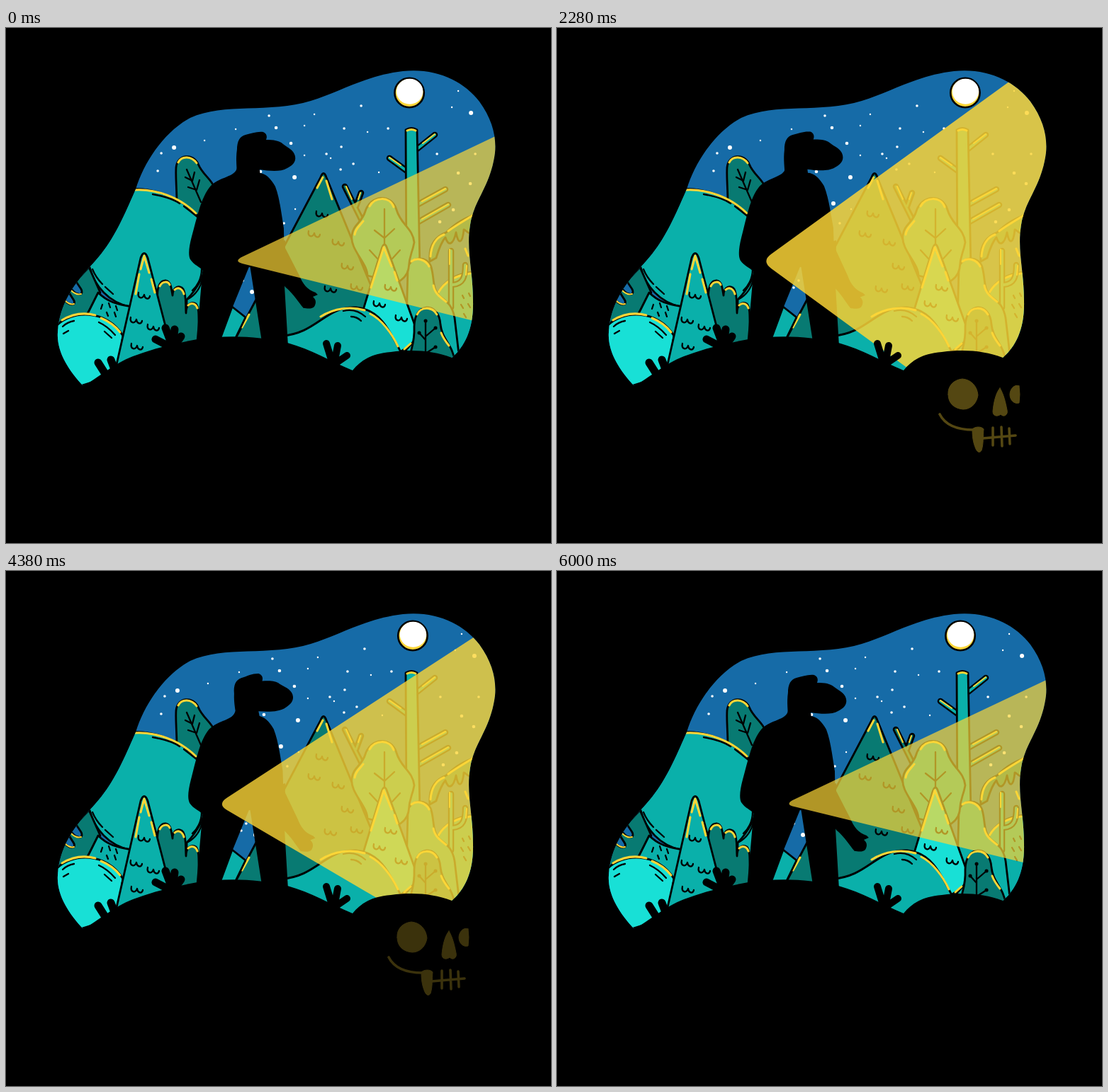
An HTML page for the animation above (6.06 s loop, 769 px wide and 728 px high).

```html
<!DOCTYPE html>
<html lang="en">
<head>
<meta charset="utf-8">
<title>Night walk</title>
<style>
  html, body { margin: 0; width: 100%; height: 100%; overflow: hidden; background: #000; }
  svg { display: block; width: 100%; height: 100%; }
  .scene path { stroke: #000; stroke-width: 2.8; stroke-linejoin: round; stroke-linecap: round; fill: none; }
  .scene .teal { fill: #0ab0aa; }
  .scene .dark { fill: #087a72; }
  .scene .bright { fill: #18e0d6; }
  .scene .sky { fill: #166ba7; }
  .scene .glow { stroke: #fdd637; stroke-width: 3; }
  .scene .ink { stroke-width: 2.3; }
  .scene .bark { stroke-width: 8.5; }
  .scene .wood { stroke: #0ab0aa; stroke-width: 4; }
  .scene .darkwood { stroke: #087a72; stroke-width: 3; }
  .scene .thin { stroke-width: 2; }
  #scales { fill: none; stroke: #000; stroke-width: 2.3; stroke-linecap: round; stroke-linejoin: round; }
  .skull path { fill: none; stroke: #fdd637; stroke-width: 3.6; stroke-linecap: round; stroke-linejoin: round; }
  .skull .solid { fill: #fdd637; stroke-width: 1; }
  .leaf { stroke: #000; stroke-width: 11; stroke-linecap: round; fill: none; }
</style>
</head>
<body>
<svg viewBox="0 0 769 728">
  <defs>
    <clipPath id="window">
      <path d="M109,506 C88,484 71,457 73,430 C75,393 94,364 118,338 C149,306 162,276 183,228 C195,189 223,147 260,127 C308,105 372,121 430,103 C472,90 508,67 560,61 C607,56 646,75 668,104 C686,129 692,153 690,176 C684,224 660,243 655,278 C649,314 659,342 659,386 C660,424 648,450 629,466 L600,520Z"/>
    </clipPath>
    <path id="scales" d="M-7,-4 C-9,4 -1,6 1,-1 C2,6 8,6 9,1"/>
  </defs>

  <g clip-path="url(#window)">
    <rect width="769" height="728" fill="#166ba7"/>
    <g id="heavens">
      <g id="stars" fill="#fff"></g>
      <circle cx="569" cy="91.5" r="20.7" fill="#fdd637" stroke="#000" stroke-width="2.6"/>
      <ellipse cx="569.5" cy="89.7" rx="18.7" ry="18" fill="#fff"/>
    </g>

    <g class="scene">
      <!-- leaf tree and big hill -->
      <path class="dark" d="M241,250 C241,225 239,210 240,197 C242,178 264,177 271,192 C277,207 290,214 293,224 C292,240 282,255 273,270Z"/>
      <path class="glow" d="M243,190 C248,180 262,181 269,191"/>
      <path class="ink" d="M255,200 L275,246 M253,211 L263,216 L266,204 M257,225 L269,229 L273,215"/>
      <path class="teal" d="M255,384 L285,340 L285,460 L255,460Z"/>
      <path class="teal" d="M60,300 L170,228 C205,224 245,238 271,266 C292,300 289,350 254,385 C225,401 195,399 175,394 C145,388 125,365 118,338Z"/>
      <path class="glow" d="M181,229 C212,227 246,240 268,262"/>
      <path class="ink" d="M207,235 C224,238 238,243 245,248 M251,252 L270,267 M122,341 C126,351 131,357 136,362 M140,366 L151,376 M276,341 C276,355 269,366 263,371 M277,355 C274,368 266,378 257,383"/>

      <!-- lower left -->
      <path class="dark" d="M60,400 L117,338 L133,374 L113,407 L70,425Z"/>
      <path class="sky" d="M88,360 C92,372 100,378 106,376 C110,370 102,366 98,356Z M76,376 C83,388 91,393 96,390 C99,385 91,381 88,371Z"/>
      <path class="glow thin" d="M92,371 Q99,378 106,376 M83,385 Q90,392 96,390"/>
      <path class="teal" d="M130,374 L113,408 L168,450 L178,394 C157,391 143,387 130,374Z"/>
      <path class="ink" d="M136,391 l-2,6 M145,389 l2,6 M155,393 l2,6 M142,402 l2,5 M153,402 l2,6"/>
      <path class="bright" d="M60,520 L70,422 C92,398 142,397 165,435 L156,490Z"/>
      <path class="glow" d="M79,413 C94,404 111,402 126,406 M134,410 C144,414 154,421 161,430"/>
      <path class="ink" d="M80,422 C85,417 90,415 96,414 M81,432 L88,428 M131,416 C142,421 148,427 154,434 M139,429 L149,438"/>

      <!-- left spruce and finger bush -->
      <path class="dark" d="M222,460 L214,385 C212,363 219,357 225,357 C232,358 233,365 235,378 C235,365 246,363 250,369 C255,378 253,390 254,403 C254,390 262,386 268,390 C273,395 272,405 272,460Z"/>
      <path class="glow" d="M217,365 C221,357 229,358 231,363 M238,370 C243,365 249,369 251,376 M257,392 C262,387 268,390 270,396"/>
      <path class="teal" d="M155,480 L190,325 Q195,312 200,325 L235,460 Z"/>
      <path class="glow" d="M183,376 L188,348 M190,341 L195,322 L202,346 M205,355 L210,374"/>
      <g>
        <use href="#scales" x="194" y="378"/><use href="#scales" x="183" y="413"/><use href="#scales" x="207" y="423"/><use href="#scales" x="184" y="450"/>
      </g>

      <!-- bare trees -->
      <path class="bark" d="M580,171 L605,151 M567,203 L541,184 M582,249 L620,228 M582,274 L624,250"/>
      <path class="wood" d="M580,171 L605,151 M567,203 L541,184 M582,249 L620,228 M582,274 L624,250"/>
      <path class="teal" d="M565,340 L564,144 Q572,139 580,144 L584,340"/>
      <path class="glow" d="M566,145 Q572,142 578,145"/>
      <path class="glow thin" d="M588,163 L605,150 M557,194 L541,183 M587,245 L620,227 M587,270 L624,249"/>
      <path class="bark" d="M505,278 L478,224 M494,252 L501,233"/>
      <path class="darkwood" d="M505,278 L478,224 M494,252 L501,233"/>
      <path class="glow thin" d="M480,224 L488,242 M500,233 L497,242"/>

      <!-- right-hand growth -->
      <path class="dark" d="M598,330 C596,308 605,295 621,289 C636,274 645,270 670,260 L670,286 L654,290 C649,288 648,285 646,285 C644,305 638,307 635,289 C631,307 624,309 620,296 C613,304 610,315 607,325Z"/>
      <path class="glow" d="M599,323 C600,307 607,296 618,292 M624,287 C635,279 644,274 660,264 M648,312 L652,322"/>
      <path class="teal" d="M599,480 L600,410 C603,369 626,343 670,345 L670,480Z"/>
      <path class="glow" d="M610,374 C618,360 632,350 655,347"/>
      <path class="ink" d="M644,378 l2,4 M653,375 l2,4 M642,391 l3,5 M652,390 l3,5 M646,404 l3,5"/>
      <path class="bark" d="M628,395 L628,315 M630,363 C645,362 648,352 648,335"/>
      <path class="wood" d="M628,395 L628,315 M630,363 C645,362 648,352 648,335"/>
      <path class="glow thin" d="M626,313 L626,334 M650,336 L649,349"/>
      <path class="teal" d="M565,420 L567,340 C570,322 595,321 600,338 C605,356 601,369 613,380 C622,387 630,392 633,410 L640,470 L570,470Z"/>
      <path class="glow" d="M572,330 C580,324 592,327 597,337 M603,364 C605,375 612,380 621,387"/>

      <!-- big spruce, round tree, bright spruce -->
      <path class="dark" d="M318,450 L444,211 Q448,200 452,211 L546,440Z"/>
      <path class="glow" d="M439,226 L447,211 M452,216 L460,242 M343,405 L333,423"/>
      <g>
        <use href="#scales" x="445" y="263"/><use href="#scales" x="434" y="291"/><use href="#scales" x="468" y="303"/><use href="#scales" x="481" y="337"/><use href="#scales" x="457" y="369"/><use href="#scales" x="494" y="366"/>
      </g>
      <path class="teal" d="M302,440 L319,394 L338,409 L323,440Z"/>
      <path class="teal" d="M510,350 C510,332 485,313 488,293 C490,277 502,276 507,259 C514,236 544,233 551,257 C557,278 574,283 576,303 C573,320 569,320 568,340 C566,350 560,355 552,360Z"/>
      <path class="glow" d="M513,252 C520,239 541,237 547,253 M492,292 C493,283 499,280 504,273"/>
      <path class="ink" d="M534,256 L534,310 M520,286 L534,297 L548,284 M513,314 L525,327 M556,314 L545,326"/>
      <path class="bright" d="M496,425 L530,312 Q534,300 538,312 L584,440 L545,465Z"/>
      <path class="glow" d="M515,367 L533,310 L544,337 M548,345 L552,357"/>
      <g>
        <use href="#scales" x="542" y="367"/><use href="#scales" x="526" y="390"/><use href="#scales" x="557" y="410"/>
      </g>

      <!-- foreground right -->
      <path class="teal" d="M390,435 C438,432 451,393 494,395 C528,398 541,427 558,460 L490,500 L390,460Z"/>
      <path class="glow" d="M444,408 C463,396 487,393 506,399 M514,404 C530,412 544,431 553,450"/>
      <path class="ink" d="M476,400 C488,397 499,401 507,408 M487,408 C493,408 498,411 501,414"/>
      <path class="teal" d="M556,465 L575,443 L580,470"/>
      <path class="glow" d="M562,454 L571,446"/>
      <path class="dark" d="M569,470 C571,452 577,447 576,422 C576,387 611,386 613,419 C615,440 630,447 633,470Z"/>
      <path class="glow" d="M580,405 C585,394 601,393 608,405 M614,431 C617,439 621,444 625,449"/>
      <path class="ink" d="M592,414 L592,462 M592,441 L583,431 M592,436 L606,424 M592,460 L606,451"/>
      <path d="M592,414 h.1 M583,431 h.1 M606,424 h.1 M606,451 h.1" style="stroke-width:5"/>
    </g>

    <g id="walker">
      <path d="M278,335 L268,450 L301,450 L302,438 L344,335 L362,450 L398,450 L393,365 L394,300Z"/>
      <g id="torso">
        <path id="arm" d="M388,290 L394,311 L414,350 C419,362 425,370 437,374 L440,377 L433,380 C438,384 438,389 435,394 C431,398 424,396 420,396 C413,388 407,377 394,366 L380,340Z"/>
        <path d="M326,198 C323,211 302,210 289,223 C275,239 269,270 262,295 C258,310 257,321 260,327 C266,336 273,337 278,343 L344,338 L393,345 L392,283 C388,258 386,240 380,224 C374,213 366,205 357,205Z"/>
      </g>
      <path id="head" d="M326,210 C326,197 324,186 326,172 C326,160 330,153 338,151 C347,149 354,146 363,147 C368,149 369,154 367,158 C377,158 386,159 391,164 C397,169 406,172 408,181 C410,190 403,195 397,198 C387,204 371,202 358,200 L359,210Z"/>
    </g>
    <path id="beam" fill="#fdd637"/>
  </g>

  <g id="ground">
    <path d="M60,535 L109,506 C140,488 153,473 185,462 C212,452 238,446 270,440 C311,434 354,435 397,445 C432,455 456,470 489,484 C501,469 517,460 543,458 C575,454 602,456 629,466 L670,500 L670,728 L60,728Z"/>
    <path class="leaf" d="M130,473 L142,492 M148,469 L154,485 M211,440 L232,451 M225,424 L234,448 M238,426 L235,448 M247,436 L237,450"/>
    <path class="leaf" d="M452,446 L460,472 M468,449 L464,470 M481,463 L465,474" style="stroke-width:10"/>
  </g>

  <g id="skull" class="skull">
    <path class="solid" d="M552,518 C551,506 560,497 572,496 C585,497 593,507 594,519 C592,532 583,539 573,539 C560,538 552,530 552,518Z"/>
    <path class="solid" d="M652,506 C645,503 639,511 639,518 C639,526 645,532 652,530 Q654,518 652,506Z"/>
    <path class="solid" d="M625,509 C619,516 616,530 615,542 C615,550 623,549 626,546 C630,551 637,547 635,540 C633,529 630,517 625,509Z"/>
    <path class="solid" d="M586,567 C590,563 599,563 602,567 C601,577 602,588 599,597 C597,601 593,600 591,595 C587,586 586,577 586,567Z"/>
    <path d="M540,546 C548,562 567,568 588,568 M601,580 L647,576 M615,565 L615,590 M627,564 L628,591 M638,566 L639,588"/>
  </g>
</svg>

<script>
const FRAME = 60, LOOP = 6060, LEAD = 40;
const find = id => document.getElementById(id);
const clamp = v => Math.max(0, Math.min(1, v));
const turn = (id, degrees, x, y, shift = 0) =>
  find(id).setAttribute("transform", `translate(${shift} 0) rotate(${degrees} ${x} ${y})`);

// Stars grouped by radius, as x,y pairs.
const stars = {
  1.2: "435,122 280,159 324,143 421,180 458,184 510,147 526,204 629,112 408,256 421,138 638,89",
  1.8: "371,124 501,110 219,177 214,202 452,178 472,200 473,168 477,142 490,192 539,142 608,178 662,178 327,367 392,276 334,357",
  2.3: "381,141 402,163 655,220 638,205 612,274 631,257 359,203",
  3: "656,120 237,169 407,211 383,248 347,373"
};
find("stars").innerHTML = Object.entries(stars).map(([r, list]) =>
  list.split(" ").map(point => {
    const [x, y] = point.split(",");
    return `<circle cx="${x}" cy="${y}" r="${r}"/>`;
  }).join("")).join("");

function drawBeam(swing) {
  const x = 320.8 - 14 * swing, y = 329.7;
  const rise = 0.473 + 0.109 * swing, fall = 0.24 + 0.212 * swing;
  const up = d => `${x + d},${y - rise * d}`, down = d => `${x + d},${y + fall * d}`;
  find("beam").setAttribute("d", `M${up(500)} L${up(14)} Q${x},${y} ${down(14)} L${down(500)}Z`);
  find("beam").setAttribute("opacity", 0.7 + 0.06 * swing);
}

function draw() {
  const time = Math.floor(performance.now() / FRAME) * FRAME % LOOP;
  const phase = (time + LEAD) % LOOP;
  const swing = Math.min(phase, LOOP - phase) / 1000;
  const seconds = time / 1000;

  drawBeam(swing);
  turn("heavens", 0, 0, 0, 3 * swing);
  turn("torso", -0.45 * swing, 335, 400);
  turn("arm", 1.5 * swing, 394, 300);
  const nod = -6.5 * Math.exp(-(((seconds - 3.85) / 1.15) ** 2));
  turn("head", nod, 340, 178, -Math.min(2.2 * swing, 5));
  find("skull").setAttribute("opacity",
    0.6 * Math.min(clamp((seconds - 1.38) / 1.62), clamp((5.25 - seconds) / 2.25)));
  requestAnimationFrame(draw);
}
draw();
</script>
</body>
</html>
```
